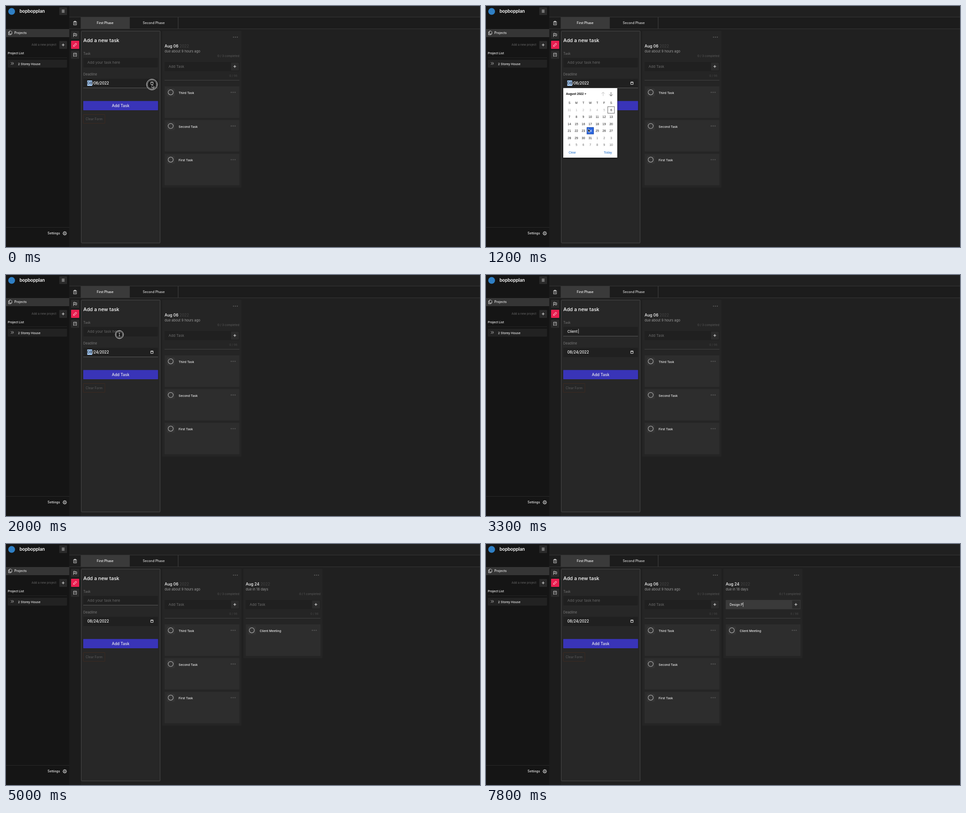
An HTML page for the animation above (8 s loop, 1049x534 px).

```html
<!DOCTYPE html>
<html lang="en">
<head>
<meta charset="utf-8">
<title>Task planner</title>
<style>
  html, body { margin: 0; width: 100%; height: 100%; overflow: hidden; background: #202020; }
  svg { display: block; width: 1049px; height: 534px; font-family: Inter, "Open Sans", sans-serif; }
  text { white-space: pre; }
  .cal text { font-family: "Liberation Sans", Arial, sans-serif; }
</style>
</head>
<body>
<svg viewBox="0 0 1049 534">
  <g id="base"></g>
  <g id="live"></g>
</svg>
<script>
const LOOP = 8000;
const $ = id => document.getElementById(id);
const pen = document.createElement('canvas').getContext('2d');

const rect = (x, y, w, h, fill, r = 0, more = '') =>
  `<rect x="${x}" y="${y}" width="${w}" height="${h}" fill="${fill}" rx="${r}" ${more}/>`;
const text = (x, y, s, size, fill = '#eee', weight = 400, anchor = 'start') =>
  `<text x="${x}" y="${y}" font-size="${size}" fill="${fill}" font-weight="${weight}" text-anchor="${anchor}">${s}</text>`;
const path = (d, stroke = '#ddd', width = 1, fill = 'none') =>
  `<path d="${d}" stroke="${stroke}" stroke-width="${width}" fill="${fill}" stroke-linejoin="round"/>`;
const circle = (x, y, r, fill, stroke = 'none', width = 1) =>
  `<circle cx="${x}" cy="${y}" r="${r}" fill="${fill}" stroke="${stroke}" stroke-width="${width}"/>`;
const plus = (x, y) => path(`M${x - 3} ${y}h6M${x} ${y - 3}v6`, '#eee', 1);
const dots = (x, y) => [-4.2, 0, 4.2].map(d => circle(x + d, y, 1.3, '#555')).join('');

function sidebar() {
  const teeth = Array.from({length: 8}, (_, i) => {
    const a = i * Math.PI / 4, c = Math.cos(a), s = Math.sin(a);
    return `M${130 + 3.2 * c} ${503.7 + 3.2 * s}L${130 + 4.5 * c} ${503.7 + 4.5 * s}`;
  }).join('');
  return rect(0, 0, 140, 534, '#151515')
    + circle(12.5, 12, 7.5, '#2f7fc4')
    + text(30, 15.2, 'bopbopplan', 9.7, '#fff', 600)
    + rect(118, 3, 17, 17, '#2a2a2a', 1) + path('M123.5 9h6M123.5 11.5h6M123.5 14h6', '#ddd', 1)
    + rect(0, 51, 140, 18, '#353535')
    + path('M7.5 55.5h3.5l2 2v4.5h-5.5zM7.5 57.5h-2v6.3h5.5v-1.8', '#ddd', .9)
    + text(18.5, 62.2, 'Projects', 7, '#eee', 500)
    + text(56.5, 88.4, 'Add a new project', 6.4, '#666')
    + rect(118, 77.5, 17, 17.5, '#2a2a2a', 1) + plus(126.5, 86.2)
    + text(4, 107, 'Project List', 6.7, '#fff', 500)
    + rect(4, 114, 131, .6, '#333')
    + rect(4, 119, 131, 17.5, '#222', 1)
    + path('M11 124.5l2.8 2.8l-2.8 2.8M14.2 124.5l2.8 2.8l-2.8 2.8', '#ddd', .9)
    + text(26.5, 130.6, '2 Storey House', 6.8, '#eee', 500)
    + rect(0, 490, 140, .8, '#303030')
    + text(92, 506.2, 'Settings', 7, '#eee', 500)
    + path(teeth, '#ddd', 1.4) + circle(130, 503.7, 3.3, 'none', '#ddd', 1) + circle(130, 503.7, 1.2, 'none', '#ddd', .8);
}

function tabs() {
  return rect(140, 24.5, 909, 26, '#1c1c1c')
    + rect(166, 25, 107, 25.5, '#3a3a3a')
    + rect(140, 24, 909, 1, '#363636') + rect(140, 50, 909, 1, '#363636')
    + rect(165, 25, 1, 25, '#303030') + rect(273, 25, 1, 25, '#363636') + rect(380.5, 25, 1, 25, '#444')
    + text(219.5, 40, 'First Phase', 6.95, '#fff', 500, 'middle')
    + text(327, 40, 'Second Phase', 7.1, '#ddd', 500, 'middle')
    + rect(140, 51, 26, 483, '#1c1c1c')
    + [55, 99].map(y => rect(144, y, 18, 18, '#292929', 1)).join('')
    + rect(144, 77, 18, 18, '#e91e50', 1)
    + path('M149.5 34.5h6.5v7.5h-6.5zM151.5 33.5h2.5v2h-2.5zM151.3 37.5h3M151.3 39.7h3', '#ddd', .9)
    + path('M149.5 68.5v-8h3.5v1.2h3.5v4.5h-3.5v-1.2h-3.5M153 61.7v3', '#ddd', .9)
    + path('M149.5 89.3v-1.8l5-5l1.8 1.8l-5 5z', '#fff', .9)
    + path('M149.5 104.5h6.5v7h-1.8l-1.4-1.5l-1.5 1.5h-1.8zM151 108l1.5-1.5l1.2 1l1.3-1.3', '#ddd', .9);
}

function form() {
  return rect(166.5, 55.5, 174.5, 469.5, '#272727', 1, 'stroke="#4a4a4a"')
    + text(171, 80, 'Add a new task', 10.9, '#fff', 500)
    + text(171, 107.6, 'Task', 7.3, '#777') + text(171, 154.2, 'Deadline', 7.4, '#777')
    + rect(171, 115, 165.5, 21, '#202020', 1) + rect(171, 161, 165.5, 21, '#202020', 1)
    + path('M320.3 168.7h5.4v5h-5.4zM320.3 169.2h5.4M321.5 167.5v1M324.5 167.5v1', '#eee', 1)
    + rect(171, 210.5, 165.5, 20.5, '#3934b8', 1)
    + text(253.7, 223.8, 'Add Task', 8.7, '#eee', 500, 'middle')
    + rect(171, 240.5, 48, 19.5, 'none', 1, 'stroke="#452c1f" stroke-width=".8"')
    + text(195, 253, 'Clear Form', 7.2, '#5c5c5c', 400, 'middle');
}

function card(x, y, title) {
  return rect(x, y, 165.5, 70, '#2d2d2d', 1)
    + rect(x + 5, y + 4.5, 17.5, 18, '#343434', 2)
    + circle(x + 13.5, y + 13.3, 5.6, 'none', '#aaa', 1.2)
    + text(x + 31, y + 17, title, 6.85, '#eee', 500)
    + dots(x + 151.7, y + 13.3);
}

function column(x, date, due, titles, entry) {
  const field = entry?.fill ?? '#202020';
  return rect(x, 55, 175, 49 + titles.length * 74.6 + 74.4, '#252525', 1)
    + dots(x + 161.7, 69)
    + `<text x="${x + 5}" y="91.8" font-size="8.8" font-weight="500" fill="#fff">${date} <tspan font-size="8.6" font-weight="400" fill="#454545">2022</tspan></text>`
    + text(x + 5, 103.3, due, 7.4, '#999')
    + text(x + 170.5, 112.7, `0 / ${titles.length} completed`, 6.5, '#5a5a5a', 400, 'end')
    + rect(x + 5, 124, 165.5, 20.5, field, 1)
    + rect(x + 152, 125.3, 17.5, 17.7, '#2b2b2b', 1) + plus(x + 160.3, 134)
    + (entry?.s ? text(x + 13.7, 136.6, entry.s, 6.95, '#eee', 500) : text(x + 13.7, 136.8, 'Add Task', 7.9, '#6a6a6a'))
    + text(x + 166, 156.8, `${entry ? entry.s.length : 0} / 98`, 6.4, '#484848', 400, 'end')
    + rect(x + 5, 164, 165.5, 1, '#444')
    + titles.map((s, i) => card(x + 5, 178 + i * 74.6, s)).join('');
}

function calendar(picked) {
  const col = i => 184.6 + (i % 7) * 15.4;
  let out = rect(171, 182, 119.5, 154, '#fff', 0, 'style="filter:drop-shadow(0 1px 2px #0008)"')
    + text(177, 197, 'August 2022', 6.6, '#000', 700)
    + path('M218 193.8h4l-2 2.4z', 'none', 0, '#222')
    + path('M259.2 199.5v-8.7M255.4 194.6l3.8-3.8l3.8 3.8', '#bbb', .9)
    + path('M276.7 190.8v8.7M272.9 195.7l3.8 3.8l3.8-3.8', '#444', .9);
  [...'SMTWTFS'].forEach((s, i) => out += text(col(i), 217, s, 6.6, '#222', 400, 'middle'));
  out += rect(269.5, 223, 14.7, 14.7, '#fff', 0, 'stroke="#555" stroke-width=".9"');
  if (picked) out += rect(223.3, 269, 14.8, 14.8, '#2a66e0', 0, 'stroke="#123a94" stroke-width=".9"');
  for (let i = 0; i < 42; i++) {
    const day = i ? (i > 31 ? i - 31 : i) : 31;
    const fill = i < 6 ? '#aaa' : i > 31 ? '#666' : picked && i === 24 ? '#fff' : '#111';
    out += text(col(i), 232.9 + Math.floor(i / 7) * 15.4, day, 6.7, fill, 400, 'middle');
  }
  return `<g class="cal">${out}${text(183, 326.7, 'Clear', 6.7, '#1467c4')}${text(278.5, 326.7, 'Today', 6.7, '#1467c4', 400, 'end')}</g>`;
}

// Typing: one time per character
const TASK = 'Client Meeting';
const TASK_AT = [2500, 2800, 3000, 3100, 3200, 3300, 3300, 3600, 3700, 3900, 4100, 4200, 4400, 4500];
const NOTE = 'Design P';
const NOTE_AT = [6400, 6800, 7000, 7100, 7200, 7300, 7500, 7800];
const typed = (s, at, t) => s.slice(0, at.filter(a => a <= t).length);

function caret(t, focus, at, x, y, s, size) {
  const last = Math.max(focus, ...at.filter(a => a <= t));
  if ((t - last) % 1000 >= 500) return '';
  pen.font = `500 ${size}px Inter, "Open Sans", sans-serif`;
  return rect(x + pen.measureText(s).width - .2, y, .8, 10.5, '#eee');
}

// Pointer: time, x, y
const MOVES = [[0, 323, 174], [400, 323, 174], [1000, 226, 272], [1400, 226, 272],
  [1900, 251, 132], [5000, 251, 132], [5600, 600, 136], [LOOP, 600, 136]];
const CLICKS = [0, 1800, 5700];

function pointer(t) {
  if ((t >= 2600 && t < 5100) || t >= 6400) return '';
  const i = MOVES.findIndex(m => m[0] > t), [t0, x0, y0] = MOVES[i - 1], [t1, x1, y1] = MOVES[i];
  const p = (t - t0) / (t1 - t0), e = p * p * (3 - 2 * p);
  const x = x0 + (x1 - x0) * e, y = y0 + (y1 - y0) * e;
  const beam = y > 115 && y < 145 && ((x > 171 && x < 336) || (x > 351 && x < 498) || (x > 530 && x < 677));
  const click = CLICKS.find(c => t >= c && t < c + 300);
  let out = '';
  if (click !== undefined) {
    const r = 12 - 3 * Math.min(1, (t - click) / 200);
    out += circle(x, y, r, '#0003', '#eee', 1) + circle(x, y, r - 2, 'none', '#ccc', .8);
  }
  if (beam) {
    const d = `M${x - 2} ${y - 3.7}q2 0 2 1.4q0 -1.4 2 -1.4M${x} ${y - 2.3}v4.8M${x - 2} ${y + 3.7}q2 0 2 -1.4q0 1.4 2 1.4`;
    return out + path(d, '#111', 2) + path(d, '#eee', .9);
  }
  return out + path(`M${x} ${y}v7.6l1.8-1.6l1.2 2.7l1.3-.6l-1.2-2.6h2.4z`, '#fff', .7, '#000');
}

function live(t) {
  const task = t < 4700 ? typed(TASK, TASK_AT, t) : '';
  const note = typed(NOTE, NOTE_AT, t);
  const onTask = t >= 2100 && t < 5800, onDate = t < 2100;
  const y = onTask ? 127.5 : 128;
  let out = task ? text(180, y, task, 8.1, '#eee', 500) : text(180, y, 'Add your task here', 8.1, '#666');
  if (onTask) out += rect(171, 135, 165.5, 1, '#5a5a5a') + caret(t, 2100, TASK_AT, 180, 119.3, task, 8.1);
  if (onDate) out += rect(171, 181, 165.5, 1, '#5a5a5a') + rect(179.8, 165, 10.8, 12, '#a5cbf7');
  out += `<text x="180" y="${onDate ? 173.8 : 174}" font-size="8.3" font-weight="500" fill="#fff"><tspan fill="${onDate ? '#2a3440' : '#fff'}">08</tspan>/${t < 1300 ? '06' : '24'}/2022</text>`;
  if (t >= 300 && t < 1300) out += calendar(t >= 1100);
  if (t >= 4700) {
    const glow = Math.round(32 + 26 * Math.min(1, Math.max(0, (t - 5800) / 500)) ** 1.3);
    out += `<g opacity="${t < 4800 ? .5 : 1}">`
      + column(525.5, 'Aug 24', 'due in 18 days', [TASK], {s: note, fill: `rgb(${glow},${glow},${glow})`}) + '</g>';
    if (t >= 5800) out += caret(t, 5800, NOTE_AT, 539.5, 129, note, 6.95);
  }
  return out + pointer(t);
}

$('base').innerHTML = sidebar() + tabs() + form()
  + column(346, 'Aug 06', 'due about 9 hours ago', ['Third Task', 'Second Task', 'First Task']);

const start = performance.now();
let shown = -1;
function tick() {
  const t = Math.floor((performance.now() - start) % LOOP / 100) * 100;
  if (t !== shown) $('live').innerHTML = live(shown = t);
  requestAnimationFrame(tick);
}
tick();
</script>
</body>
</html>
```
